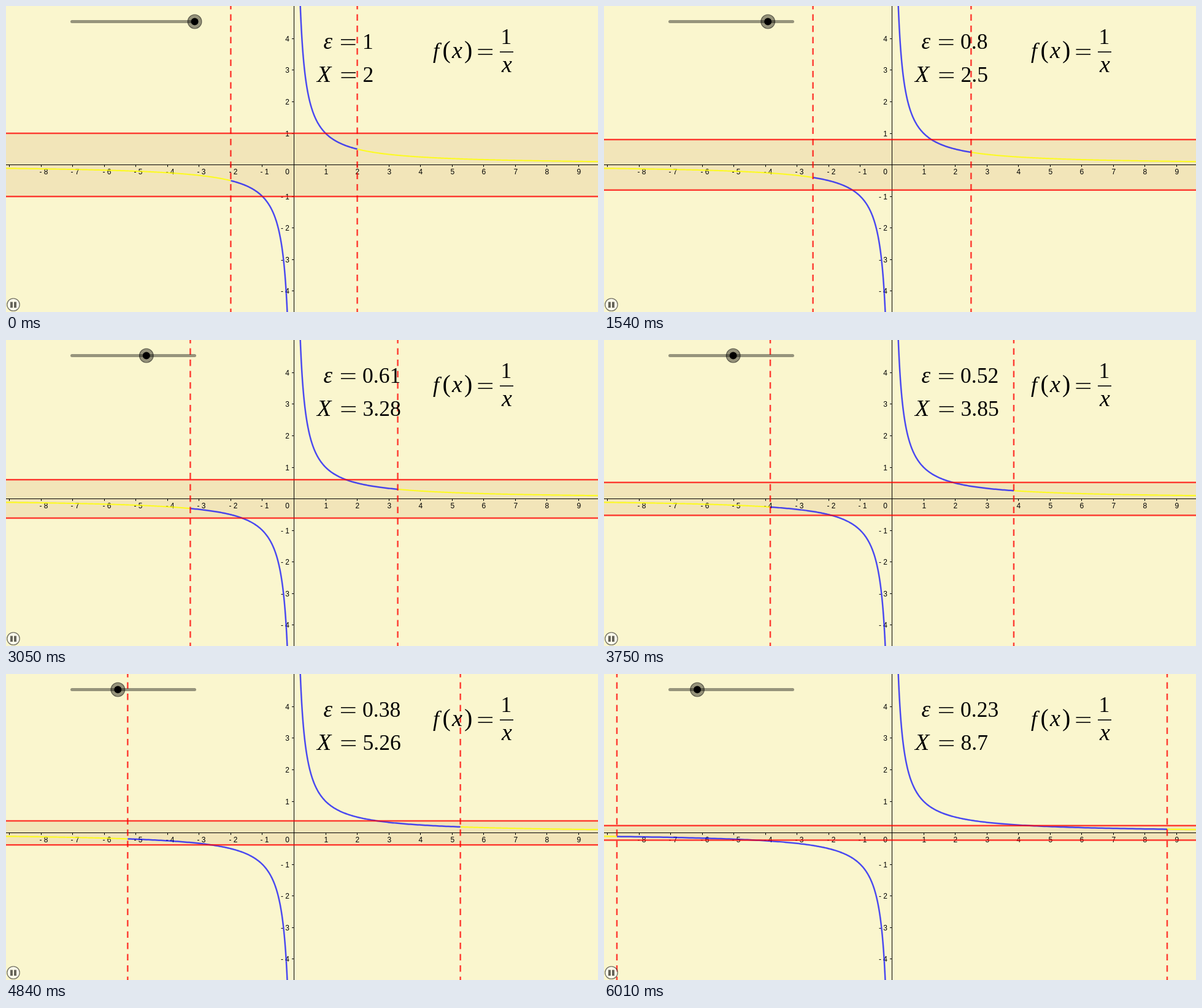
An HTML page with a canvas that plays this animation: 965x500 px, repeating every 6.09 s.

```html
<!DOCTYPE html>
<html lang="en">
<head>
<meta charset="utf-8">
<title>Limit of 1/x at infinity</title>
<style>
  html, body { margin: 0; width: 100%; height: 100%; overflow: hidden; background: #faf6ce; }
  canvas { display: block; width: 965px; height: 500px; }
</style>
</head>
<body>
<canvas id="stage" width="965" height="500"></canvas>
<script>
const W = 965, H = 500, LOOP = 6090;
const OX = 469.5, OY = 259.6, UNIT = 51.55;
const RED = 'rgba(255,0,0,0.75)';
const BLUE = 'rgba(0,0,255,0.7)';
const YELLOW = 'rgba(255,255,0,0.8)';
const SANS = '12px "Liberation Sans", Arial, sans-serif';
const ctx = document.getElementById('stage').getContext('2d');

const px = x => OX + x * UNIT;
const py = y => OY - y * UNIT;

// Runs of ticks: first time, last time, count.
const runs = [
  [80, 620, 8], [690, 1220, 8], [1300, 1850, 8], [1930, 2480, 8], [2560, 3120, 8],
  [3200, 3750, 8], [3830, 4430, 9], [4520, 5080, 8], [5170, 5310, 3], [5400, 5700, 5],
  [5780, 6010, 4]
];
const ticks = runs.flatMap(([from, to, n]) =>
  Array.from({ length: n }, (_, i) => Math.round((from + (to - from) * i / (n - 1)) / 10) * 10));

function line(x1, y1, x2, y2, color, width) {
  ctx.strokeStyle = color;
  ctx.lineWidth = width;
  ctx.beginPath();
  ctx.moveTo(x1, y1);
  ctx.lineTo(x2, y2);
  ctx.stroke();
}

function disc(x, y, r, fill, stroke) {
  ctx.beginPath();
  ctx.arc(x, y, r, 0, Math.PI * 2);
  ctx.fillStyle = fill;
  ctx.fill();
  if (stroke) {
    ctx.strokeStyle = stroke;
    ctx.lineWidth = 1.3;
    ctx.stroke();
  }
}

function math(str, x, y, size, italic) {
  ctx.font = `${italic ? 'italic ' : ''}${size}px "Liberation Serif", "Times New Roman", serif`;
  ctx.fillText(str, x, y);
}

function equals(x, y) {
  ctx.fillRect(x, y - 4.8, 23.5, 1.6);
  ctx.fillRect(x, y + 3.2, 23.5, 1.6);
}

function axes() {
  ctx.fillStyle = '#000';
  ctx.fillRect(0, 259, W, 1);
  ctx.fillRect(469, 0, 1, H);
  ctx.font = SANS;
  const label = n => n < 0 ? '- ' + -n : String(n);
  for (let n = -9; n <= 9; n++) {
    if (!n) continue;
    const x = Math.floor(px(n));
    ctx.fillRect(x, 260, 1, 3);
    if (n > -9) ctx.fillText(label(n), x - 2.5, 275);
  }
  ctx.textAlign = 'right';
  for (let n = -4; n <= 4; n++) {
    if (!n) continue;
    const y = Math.floor(py(n));
    ctx.fillRect(466, y, 3, 1);
    ctx.fillText(label(n), 462, y + 4.5);
  }
  ctx.fillText('0', 462, 275);
  ctx.textAlign = 'left';
}

function curve(from, to, color, width) {
  ctx.strokeStyle = color;
  ctx.lineWidth = width;
  ctx.beginPath();
  for (let i = 0; i <= 240; i++) {
    const x = from * Math.pow(to / from, i / 240);
    ctx.lineTo(px(x), py(1 / x));
  }
  ctx.stroke();
}

function formulas(eps, bound) {
  ctx.fillStyle = '#000';
  math('ε', 517.5, 70, 37, true);
  equals(546, 59);
  math(String(eps), 581, 70, 35.5);

  math('X', 507, 124, 38, true);
  equals(546.5, 113);
  math(String(bound), 581.5, 124, 35.5);

  math('f', 696, 85, 36, true);
  math('(', 711.5, 85, 40);
  math('x', 727, 85, 38, true);
  math(')', 747, 85, 40);
  equals(769.5, 75);
  math('1', 806.5, 62, 35.5);
  ctx.fillRect(805, 74.3, 22, 1.6);
  math('x', 808, 108, 38, true);
}

function slider(eps) {
  const shade = 'rgba(0,0,0,0.4)';
  ctx.lineCap = 'round';
  line(107.5, 25.5, 307.5, 25.5, shade, 5);
  ctx.lineCap = 'butt';
  const x = 105.6 + 202 * eps;
  disc(x, 25.5, 11.3, shade, 'rgba(0,0,0,0.5)');
  disc(x, 25.5, 6, '#000');
}

function pauseButton() {
  disc(12, 488, 10.2, 'rgba(255,255,255,0.6)', 'rgba(0,0,0,0.55)');
  ctx.fillStyle = '#66645a';
  ctx.fillRect(7, 483.5, 4, 9.5);
  ctx.fillRect(13, 483.5, 4, 9.5);
}

function draw(time) {
  const step = ticks.filter(t => t <= time).length;
  const eps = (100 - step) / 100;
  const bound = Math.round(200 / eps) / 100;

  ctx.fillStyle = '#faf6ce';
  ctx.fillRect(0, 0, W, H);
  ctx.fillStyle = '#f2e5b9';
  ctx.fillRect(0, py(eps), W, 2 * eps * UNIT);
  axes();

  for (const side of [-1, 1]) {
    curve(side * bound, side * 10, YELLOW, 2.2);
    curve(side * 0.15, side * bound, BLUE, 2.5);
    line(0, py(side * eps), W, py(side * eps), RED, 2.5);
    ctx.setLineDash([10.5, 8]);
    line(px(side * bound), -5, px(side * bound), H + 5, RED, 2.5);
    ctx.setLineDash([]);
  }

  formulas(eps, bound);
  slider(eps);
  pauseButton();
}

const start = performance.now();
function loop() {
  draw((performance.now() - start) % LOOP);
  requestAnimationFrame(loop);
}
loop();
</script>
</body>
</html>
```
